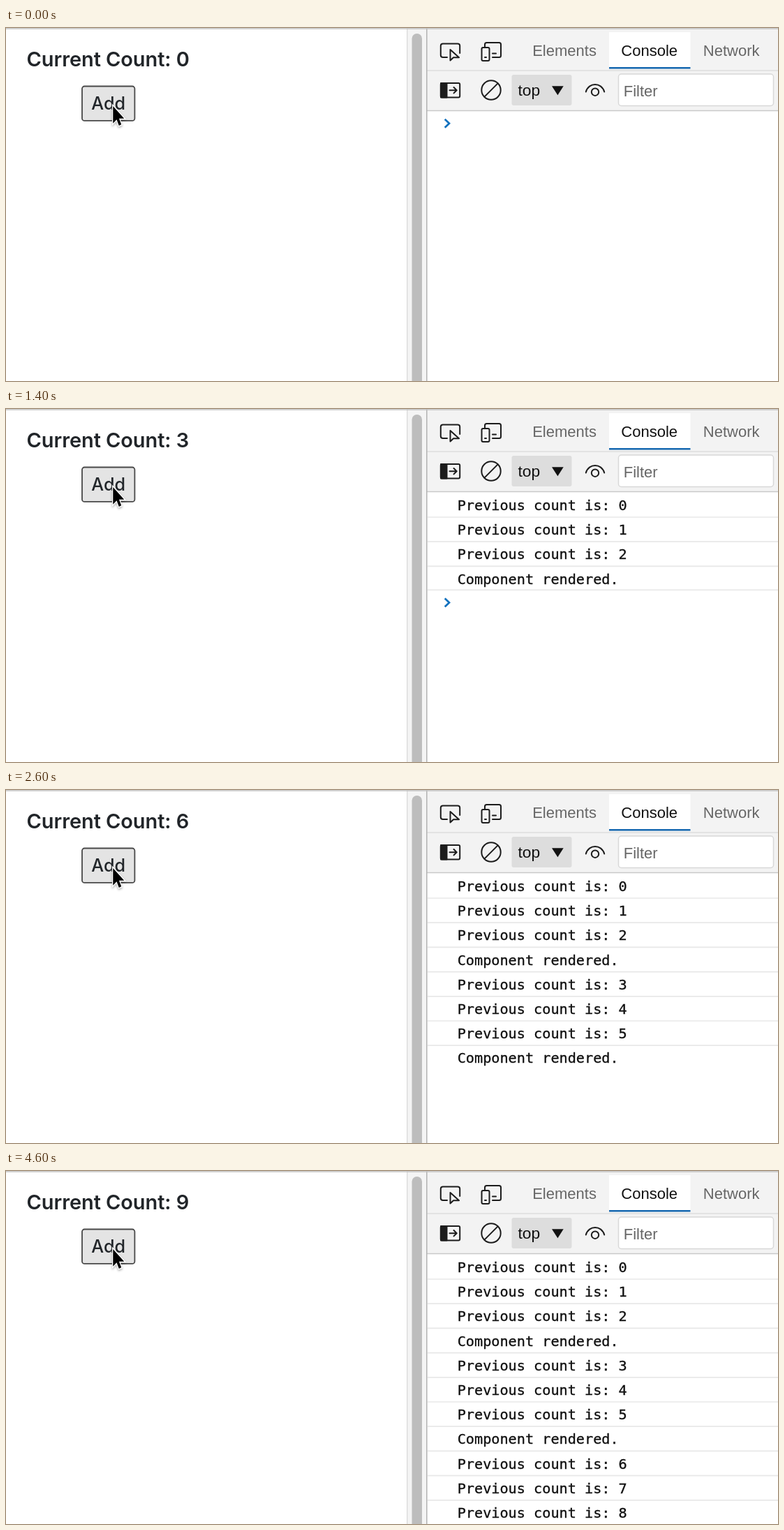
Recreate the animation shown at these times as an HTML page. Size 1106 by 506 pixels, loop 5000 ms.

```html
<!DOCTYPE html>
<html lang="en">
<head>
<meta charset="utf-8">
<title>Counter and console</title>
<style>
  html, body { margin: 0; width: 100%; height: 100%; overflow: hidden; background: #fff; }
  svg { display: block; width: 1106px; height: 506px; }
  text { white-space: pre; }
  .page { font-family: Inter, sans-serif; fill: #212529; }
  .tools { font: 22px "Liberation Sans", Arial, sans-serif; fill: #666; }
  .log { font: 20.2px "DejaVu Sans Mono", monospace; fill: #111; stroke: #111; stroke-width: .35; }
  .dark { fill: #111; }
  .icon { fill: none; stroke: #1c1c1c; stroke-width: 2; stroke-linejoin: round; stroke-linecap: round; }
</style>
</head>
<body>
<svg viewBox="0 0 1106 506">
  <!-- Page -->
  <text class="page" id="count" x="29.6" y="54.7" font-size="29" font-weight="600" letter-spacing="-.1"></text>
  <rect id="button" x="109" y="83.5" width="75.4" height="49.4" rx="3.5" stroke-width="1.8"/>
  <text class="page" x="146.7" y="117.1" font-size="25.2" font-weight="450" text-anchor="middle">Add</text>
  <circle id="ring" cx="152.2" cy="113.5" r="39.4" fill="none" stroke="#0a0a0a" stroke-width="2.6"/>
  <path d="M0 0V16L3.7 12.4L6 18L8.4 17L6.1 11.5H11.3Z" transform="translate(153.3 112) scale(1.42 1.55)"
        stroke="#fff" stroke-width="1.9" paint-order="stroke" style="filter:drop-shadow(0 1px 1px #0005)"/>

  <!-- Scrollbar -->
  <path d="M574 0H603V506H574Z" fill="#f4f4f4"/>
  <path d="M574.7 0V506" stroke="#dcdcdc" stroke-width="1.5"/>
  <rect x="581.5" y="8" width="14.5" height="520" rx="7.2" fill="#bdbdbd"/>

  <!-- Developer tools -->
  <path d="M603 0H1106V118H603Z" fill="#f3f3f3"/>
  <path d="M603 61H1106" stroke="#dedede" stroke-width="1.6"/>
  <path d="M603 118.5H1106" stroke="#c9c9c9" stroke-width="1.5"/>
  <path d="M602.8 0V506" stroke="#b5b5b5" stroke-width="1.6"/>
  <path d="M864 6H980.5V58H864Z" fill="#fff"/>
  <path d="M864 57.3H980.5" stroke="#1567b0" stroke-width="2.6"/>
  <g class="tools">
    <text x="754.2" y="39.5">Elements</text>
    <text x="881.3" y="39.5" class="dark">Console</text>
    <text x="998.8" y="39.5">Network</text>
    <rect x="724.5" y="67" width="86" height="44" rx="3" fill="#dddddd"/>
    <text x="733.5" y="97" font-size="22.8" class="dark">top</text>
    <path d="M782 83.3H798.7L790.4 96.3Z" class="dark"/>
    <rect x="877.5" y="66" width="222" height="45.5" rx="4" fill="#fff" stroke="#d8d8d8" stroke-width="1.5"/>
    <text x="884.8" y="98">Filter</text>
  </g>
  <g class="icon">
    <path d="M632 42H626Q622.8 42 622.8 39V25.5Q622.8 22.5 626 22.5H647Q650.2 22.5 650.2 25.5V36"/>
    <path d="M636.5 31V46.5L641 42.2H649Z" fill="#f3f3f3"/>
    <path d="M686 27V23.5Q686 21 688.5 21H706.5Q709 21 709 23.5V39.5Q709 42 706.5 42H697M697 36.5H702"/>
    <rect x="681.5" y="28" width="11" height="19" rx="2"/>
    <path d="M686 42H688"/>
    <rect x="622.8" y="79" width="27.4" height="20.5" rx="2"/>
    <path d="M623 79H631.5V99.5H623Z" fill="#1c1c1c"/>
    <path d="M635.5 89.2H645.5M641.5 85L645.7 89.2L641.5 93.4"/>
    <circle cx="695" cy="89" r="13.7"/>
    <path d="M685.4 98.6L704.6 79.4"/>
    <path d="M830.8 91.5C834.5 77.5 853.5 77.5 857.2 91.5"/>
    <circle cx="844" cy="91.7" r="5.2"/>
  </g>
  <path d="M0 1H1106" stroke="#c2c2c2" stroke-width="1.7"/>

  <g id="rows"></g>
  <path id="prompt" d="M628.7 130.8L635 136.8L628.7 142.8" fill="none" stroke="#1271be" stroke-width="2.7"/>
</svg>

<script>
const LOOP = 5000, ROW = 35.2, MAX_ROWS = 11;
const el = id => document.getElementById(id);

// Each step changes only the listed parts of the state.
const steps = [
  [0, { clicks: 0, ring: false, pressed: false, prompt: true }],
  [200, { ring: true }],
  [400, { ring: false, pressed: true }],
  [600, { clicks: 1, pressed: false }],
  [2400, { ring: true, pressed: true }],
  [2600, { clicks: 2, ring: false, pressed: false, prompt: false }],
  [2800, { prompt: true }],
  [4000, { ring: true, pressed: true }],
  [4200, { ring: false }],
  [4400, { clicks: 3, pressed: false }]
];

function add(parent, tag, attributes, text = "") {
  const node = document.createElementNS("http://www.w3.org/2000/svg", tag);
  for (const name in attributes) node.setAttribute(name, attributes[name]);
  node.textContent = text;
  return parent.appendChild(node);
}

const rows = Array.from({ length: MAX_ROWS }, (_, i) => {
  const group = add(el("rows"), "g", {});
  const message = i % 4 === 3
    ? "Component rendered."
    : `Previous count is: ${i - Math.floor(i / 4)}`;
  add(group, "text", { class: "log", x: 646.7, y: 145 + i * ROW }, message);
  const line = add(group, "path", { d: `M604 ${155 + i * ROW}H1106`, stroke: "#e8e8e8", "stroke-width": 1.7 });
  return { group, line };
});

const show = (node, visible) => node.setAttribute("visibility", visible ? "visible" : "hidden");

function draw(time) {
  const state = Object.assign({}, ...steps.filter(([start]) => start <= time).map(step => step[1]));
  const rowCount = state.clicks * 4;

  el("count").textContent = `Current Count: ${state.clicks * 3}`;
  el("button").setAttribute("fill", state.pressed ? "#f5f5f5" : "#e4e4e4");
  el("button").setAttribute("stroke", state.pressed ? "#8a8a8a" : "#484848");
  show(el("ring"), state.ring);
  show(el("prompt"), state.prompt);
  el("prompt").setAttribute("transform", `translate(0 ${rowCount * ROW})`);

  rows.forEach(({ group, line }, i) => {
    const last = i === rowCount - 1;
    show(group, i < rowCount);
    show(line, i < rowCount && (!last || state.prompt));
    line.setAttribute("transform", `translate(0 ${last ? -1.2 : 0})`);
  });
}

function tick() {
  draw(performance.now() % LOOP);
  requestAnimationFrame(tick);
}
tick();
</script>
</body>
</html>
```
